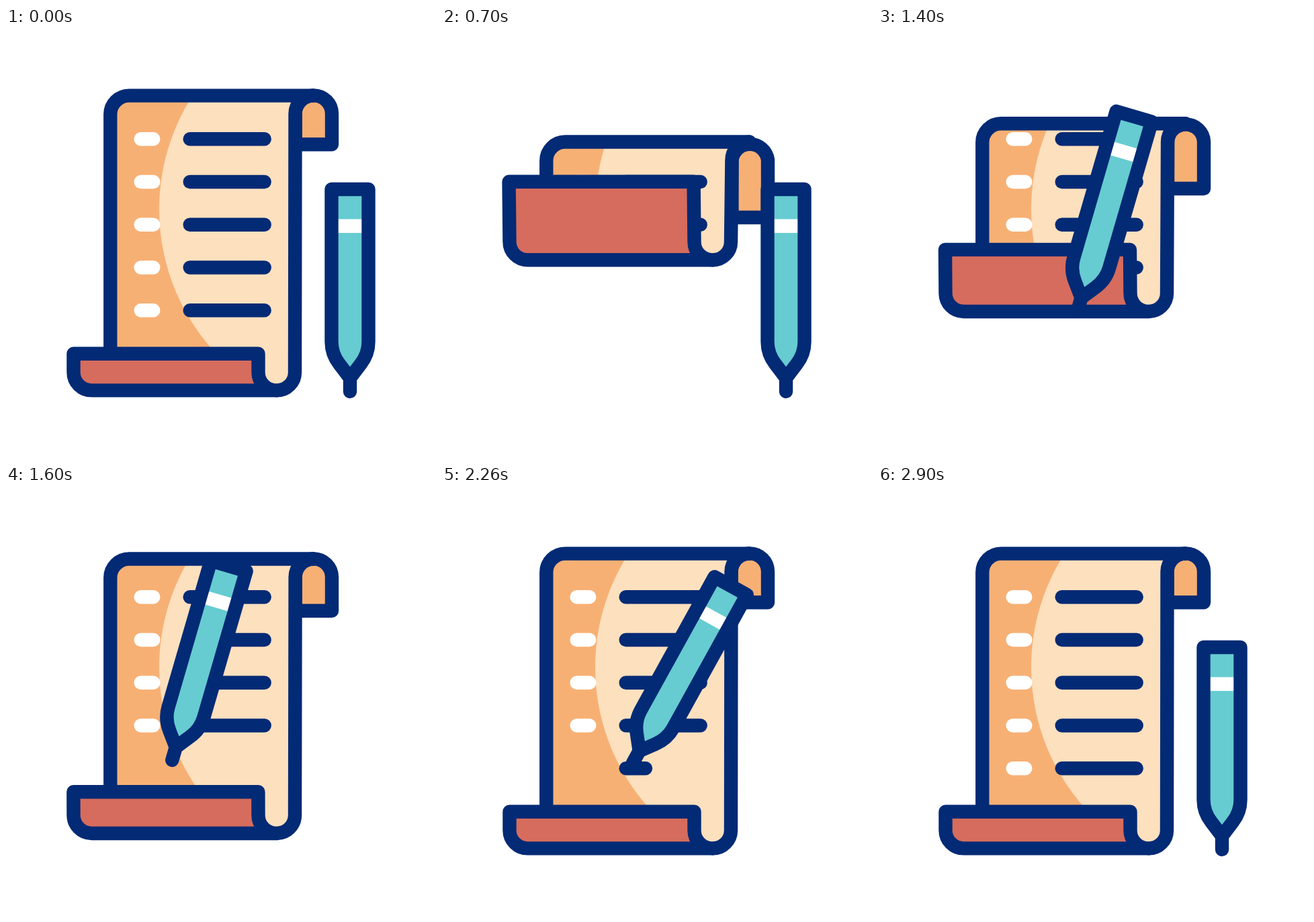
Write an HTML page that moves like this. It is 640 by 640 pixels and loops after 3000 ms.

```html
<!DOCTYPE html>
<html lang="en">
<head>
<meta charset="utf-8">
<title>Scroll and pen</title>
<style>
  html, body { margin: 0; width: 100%; height: 100%; overflow: hidden; background: #fff; }
  svg { display: block; width: 100vw; height: 100vh; }
  .ink { fill: none; stroke: #032a75; stroke-width: 20.4; stroke-linecap: round; stroke-linejoin: round; }
  .dot { stroke: #fff; }
</style>
</head>
<body>
<svg viewBox="0 0 640 640">
  <defs><clipPath id="pageClip"><path id="pageShape"/></clipPath></defs>
  <path id="hook" class="ink" style="fill:#f7b074"/>
  <g clip-path="url(#pageClip)">
    <rect width="640" height="640" fill="#f7b074"/>
    <circle cx="542" cy="270" r="314" fill="#fde0be"/>
    <g id="rows"></g>
  </g>
  <path id="page" class="ink"/>
  <path id="flap" class="ink" style="fill:#d66c5d"/>
  <path id="sheet" class="ink"/>
  <g id="pen">
    <path d="M484.5 240H539.5V467C539.5 480 535 491 528 500L512 521L496 500C489 491 484.5 480 484.5 467Z" fill="#66ccd1"/>
    <path d="M485 284.5H539V305H485Z" fill="#fff"/>
    <path class="ink" d="M484.5 240H539.5V467C539.5 480 535 491 528 500L512 521L496 500C489 491 484.5 480 484.5 467ZM512 521V541"/>
  </g>
</svg>
<script>
const LOOP = 3000;
const HOME = { x: 512, y: 541 };
const $ = id => document.getElementById(id);
const draw = (id, d) => $(id).setAttribute('d', d);

// Eased 0..1 progress between two times
const ease = (t, from, to) => {
  const u = Math.min(1, Math.max(0, (t - from) / (to - from)));
  return u * u * (3 - 2 * u);
};

// Keyframes are [time, value] pairs, eased in and out of each one
const track = (keys, t) => keys.slice(1).reduce((value, [time, next], i) =>
  value + (next - keys[i][1]) * ease(t, keys[i][0], time), keys[0][1]);

const penX = [[845, 512], [1615, 247], [2160, 256], [2480, 375], [2800, 512]];
const penY = [[845, 541], [1533, 408], [1615, 408], [1880, 333], [2140, 412], [2480, 412], [2800, 541]];
const penAngle = [[893, 0], [1318, 16.2], [1615, 16.2], [2250, 29], [2480, 17], [2800, 0]];

function addStroke(cls) {
  const path = document.createElementNS('http://www.w3.org/2000/svg', 'path');
  path.setAttribute('class', cls);
  $('rows').append(path);
  return path;
}

const rows = Array.from({ length: 5 }, (_, i) => ({
  y: 165.2 + i * 63.75,
  dot: addStroke('ink dot'),
  line: addStroke('ink')
}));

function setStroke(path, x, y, length, shown = true) {
  path.setAttribute('d', shown ? `M${x} ${y}h${Math.max(length, 0.01)}` : '');
}

rows.forEach(({ y, dot, line }) => {
  setStroke(dot, 200.7, y, 18.6);
  setStroke(line, 273.7, y, 111);
});

function drawScroll(t) {
  const p = ease(t, 210, 810) - ease(t, 1122, 1722);
  const top = 100.6 + 75.5 * p;
  const curl = 173.2 + 119.2 * p;
  const lip = 484.8 - 280.4 * p;
  const bottom = 539.4 - 212.6 * p;
  const left = 100.5 - p, fold = 375.5 - p, side = 430.5 + p;
  const low = bottom - 27;

  draw('hook', `M${side} ${curl}V${top + 27}A27 27 0 0 1 485 ${top + 27}V${curl}Z`);
  draw('pageShape', `M155.3 ${lip}V${top + 28}A28 28 0 0 1 183.3 ${top}H457.5
    A27 27 0 0 0 ${side} ${top + 27}L430 ${low}A27 27 0 0 1 ${fold} ${low}V${lip}Z`);
  draw('page', `M155.3 ${lip}V${top + 28}A28 28 0 0 1 183.3 ${top}H457.5`);
  draw('flap', `M${left} ${lip}H${fold}L375.5 ${low}A27 27 0 0 0 403 ${bottom}
    H127.5A27 27 0 0 1 100.5 ${low}Z`);
  draw('sheet', `M457.5 ${top}A27 27 0 0 0 ${side} ${top + 27}L430 ${low}A27 27 0 0 1 403 ${bottom}`);
}

function drawLastRow(t) {
  const { y, dot, line } = rows[4];
  const erased = t > 810;
  setStroke(line, 273.7, y, 111 * (erased ? ease(t, 2160, 2460) : 1), !erased || t > 2160);
  setStroke(dot, 200.7, y, 18.6 * (erased ? ease(t, 2700, 2840) : 1), !erased || t > 2700);
}

function drawPen(t) {
  const x = track(penX, t), y = track(penY, t), angle = track(penAngle, t);
  $('pen').setAttribute('transform',
    `translate(${x} ${y}) rotate(${angle}) translate(${-HOME.x} ${-HOME.y})`);
}

function render(t) {
  drawScroll(t);
  drawLastRow(t);
  drawPen(t);
}

const start = performance.now();
function tick() {
  render((performance.now() - start) % LOOP);
  requestAnimationFrame(tick);
}
tick();
</script>
</body>
</html>
```
